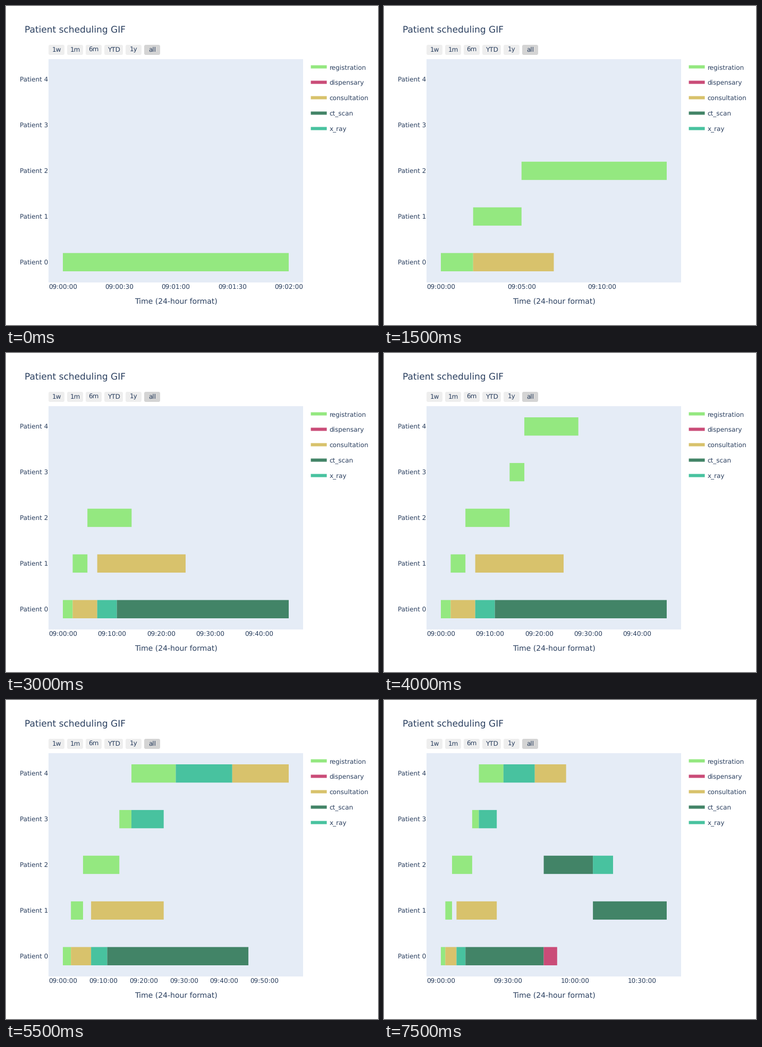
Animation of 700 by 600 pixels, one loop 8 s. Source, as a matplotlib script:

```python
import matplotlib.pyplot as plt
from matplotlib.animation import FuncAnimation
from matplotlib.patches import FancyBboxPatch, Rectangle

W, H, DPI = 700, 600, 100
INK = "#2a3f5f"
LEFT, SPAN, EDGE = 107, 425, 559      # time axis in pixels
ROW0, ROW_GAP, BAR_H = 481.82, 85.91, 34.36
STEPS = (0.5, 1, 2, 5, 10, 15, 30, 60)  # minutes
MIN_TICK_GAP = 70

COLORS = {
    "registration": "#94e880",
    "dispensary": "#ca4c78",
    "consultation": "#d8c26c",
    "ct_scan": "#428467",
    "x_ray": "#48c29f",
}

# patient, task, start minute, end minute; one is added per step
TASKS = [
    (0, "registration", 0, 2),
    (1, "registration", 2, 5),
    (0, "consultation", 2, 7),
    (2, "registration", 5, 14),
    (1, "consultation", 7, 25),
    (0, "x_ray", 7, 11),
    (0, "ct_scan", 11, 46),
    (3, "registration", 14, 17),
    (4, "registration", 17, 28),
    (3, "x_ray", 17, 25),
    (4, "x_ray", 28, 42),
    (4, "consultation", 42, 56),
    (2, "ct_scan", 46, 68),
    (0, "dispensary", 46, 52),
    (1, "ct_scan", 68, 101),
    (2, "x_ray", 68, 77),
]

plt.rcParams.update({"font.family": "DejaVu Sans", "text.hinting": "none"})
fig = plt.figure(figsize=(W / DPI, H / DPI), dpi=DPI, facecolor="white")
ax = fig.add_axes([0, 0, 1, 1])
ax.set_xlim(0, W)
ax.set_ylim(H, 0)
ax.axis("off")


def rect(x, y, w, h, color):
    return ax.add_patch(Rectangle((x, y), w, h, fc=color, lw=0, snap=False))


def label(x, y, text, px=12, ha="left"):
    return ax.text(x, y, text, fontsize=px * 72 / DPI, color=INK,
                   ha=ha, va="baseline")


def clock(minutes):
    s = round(minutes * 60)
    return f"{9 + s // 3600:02d}:{s // 60 % 60:02d}:{s % 60:02d}"


def draw_static():
    label(35, 50, "Patient scheduling GIF", 17)
    label(319.5, 560, "Time (24-hour format)", 14, "center")
    rect(80, 100, 479, 420, "#e5ecf6")

    x = 80
    for name in ("1w", "1m", "6m", "YTD", "1y", "all"):
        w = 35 if name == "YTD" else 30
        shade = "#d4d4d4" if name == "all" else "#eeeeee"
        ax.add_patch(FancyBboxPatch((x, 73), w, 19, fc=shade, lw=0,
                                    boxstyle="round,pad=0,rounding_size=3"))
        label(x + w / 2, 86, name, ha="center")
        x += w + 5

    for i in range(5):
        label(79, round(ROW0 - i * ROW_GAP + 4.2), f"Patient {i}", ha="right")

    for i, (name, color) in enumerate(COLORS.items()):
        y = 114.5 + 29 * i
        rect(573.6, y - 3, 30, 6, color)
        label(608.6, round(y + 4.7), name)


draw_static()
bars = [rect(LEFT, ROW0 - p * ROW_GAP - BAR_H / 2, 0, BAR_H, COLORS[task])
        for p, task, _, _ in TASKS]
ticks = [label(LEFT, 533, "", ha="center") for _ in range(8)]


def update(i):
    scale = SPAN / max(end for *_, end in TASKS[:i + 1])
    for k, (bar, (_, _, start, end)) in enumerate(zip(bars, TASKS)):
        bar.set_visible(k <= i)
        bar.set_x(LEFT + start * scale)
        bar.set_width((end - start) * scale)

    step = next(s for s in STEPS if s * scale >= MIN_TICK_GAP)
    for k, tick in enumerate(ticks):
        x = LEFT + k * step * scale
        tick.set_x(x)
        tick.set_text(clock(k * step))
        tick.set_visible(x <= EDGE)
    return bars + ticks


anim = FuncAnimation(fig, update, frames=len(TASKS), interval=500,
                     repeat=True, repeat_delay=0)
plt.show()
```
